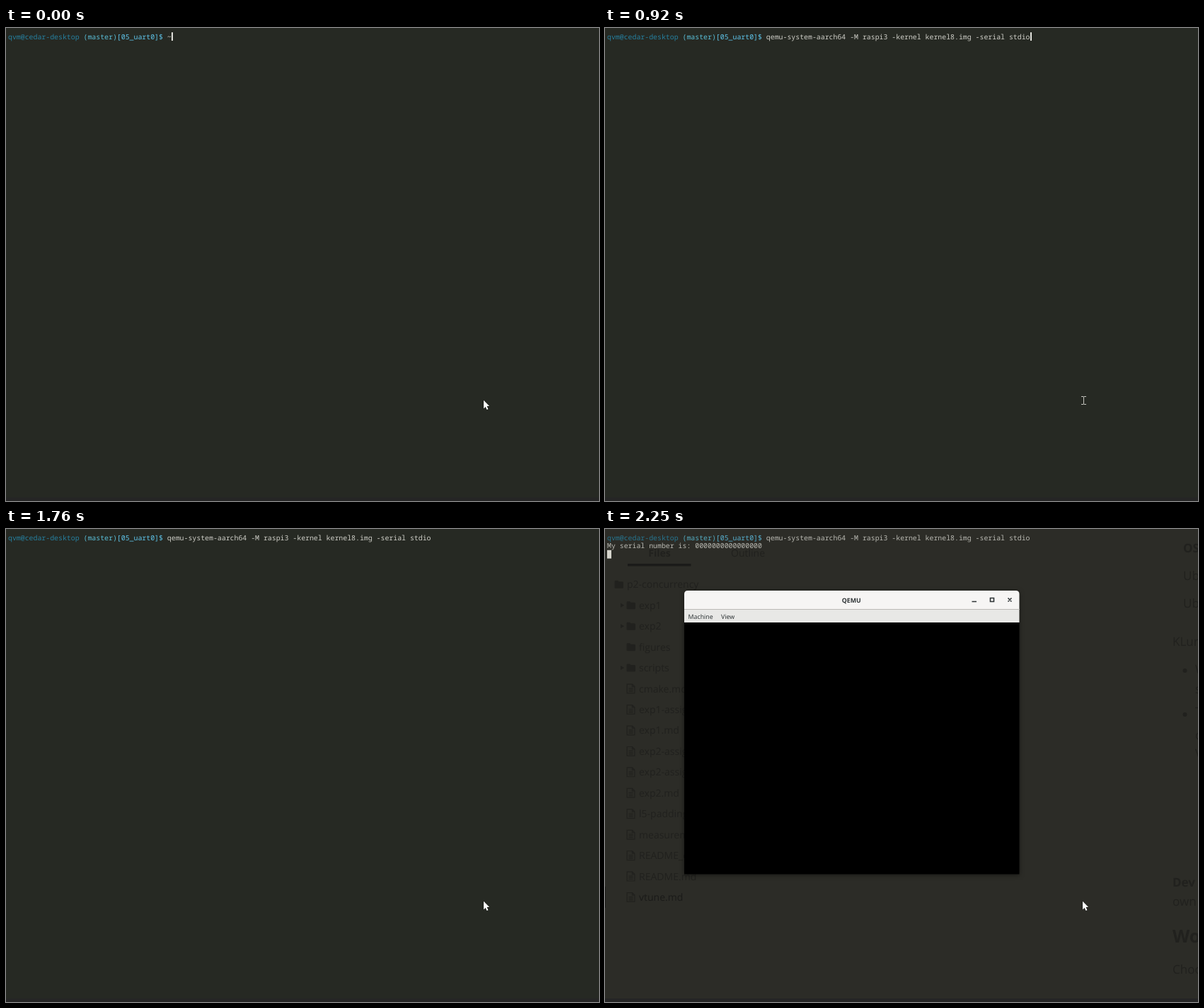
These frames come from a looping animation (838x668 px, 3630 ms). An HTML page:

```html
<!DOCTYPE html>
<html lang="en">
<head>
<meta charset="utf-8">
<title>Terminal session</title>
<style>
  html, body { margin: 0; width: 100%; height: 100%; overflow: hidden; background: #262923; }
  svg { display: block; width: 838px; height: 668px; text-rendering: geometricPrecision; }
  #term { font: 9.87px "Noto Sans Mono", "DejaVu Sans Mono", monospace; fill: #d0d0c9; }
  #term.blurred { opacity: .86; }
  #term text { white-space: pre; }
  .user { fill: #2680a0; }
  .branch { fill: #5abfd8; }
  .dir { fill: #5fc6ec; }
  #ghost { font: 14px "Open Sans", "Noto Sans", sans-serif; fill: #21211e; }
  #ghost .doc { font-size: 17px; }
  #ghost .bold { font-weight: 700; }
  #ghost .active { fill: #1b1b19; }
  #win { font: 8.8px "Noto Sans", "Open Sans", sans-serif; fill: #2e3436; filter: drop-shadow(0 1px 3px rgba(0, 0, 0, .5)); }
</style>
</head>
<body>
<svg viewBox="0 0 838 668">
  <defs>
    <path id="folder" d="M0 1.5q0-1.5 1.5-1.5h3l1.5 1.5h5q1.5 0 1.5 1.5v6.500q0 1.500-1.500 1.500h-9.500q-1.500 0-1.500-1.500z"/>
    <path id="file" fill="none" stroke="#21211e" stroke-width="1.2"
      d="M.6.6h7.400l3.400 3.400v9.400h-10.800zM8 .6v3.400h3.400M3 6.500h6M3 8.700h6M3 10.900h6"/>
  </defs>
  <rect id="back" width="838" height="668"/>
  <g id="ghost">
    <text class="bold" x="77" y="38.5" text-anchor="middle">Files</text>
    <text x="202" y="38.5" text-anchor="middle">Outline</text>
    <rect class="active" x="32" y="49" width="89.5" height="3.5"/>
    <rect class="active" y="505" width="1" height="30"/>
  </g>
  <rect y="663" width="838" height="5" fill="#252525"/>
  <g id="term">
    <text x="3" y="15.5"><tspan class="user">qvm@cedar-desktop</tspan> <tspan class="branch">(master)</tspan><tspan class="dir">[05_uart0]$ </tspan><tspan id="command"></tspan></text>
    <text id="output" x="3" y="27.4"></text>
  </g>
  <rect id="caret"/>
  <g id="win">
    <path fill="#f6f5f4" d="M112 114v-22q0-5 5-5h463.5q5 0 5 5v22z"/>
    <rect x="112" y="113" width="473.5" height="19" fill="#e8e8e6"/>
    <rect x="112" y="113" width="473.5" height="1" fill="#bcbab7"/>
    <rect x="112" y="132" width="473.5" height="355.5" fill="#000"/>
    <text x="348.3" y="103.5" text-anchor="middle" font-weight="700">QEMU</text>
    <text x="117.5" y="126.5">Machine</text>
    <text x="164" y="126.5">View</text>
    <path fill="none" stroke="#2e3436" stroke-width="1.6"
      d="M518.5 102.5h6.5M544.5 97.5h5v5h-5zM569.5 97.5l5 5m0-5l-5 5"/>
  </g>
  <path id="arrow" fill="#fff" stroke="#141512" stroke-width="1" paint-order="stroke"
    d="M675 525.800v11.600l2.600-2.500 1.900 4.200 2-.9-1.900-4.100h3.500z"/>
  <path id="beam" fill="none" stroke="#c6c6c0"
    d="M673 520.500h3l.5.5.5-.5h3M673 531.500h3l.5-.5.5.5h3M676.500 521v10"/>
</svg>
<script>
const LOOP = 3630, CELL = 5.922, ROW = 11.85;
const $ = id => document.getElementById(id);
const ghost = $("ghost");

function add(tag, attrs, text = "") {
  const el = document.createElementNS("http://www.w3.org/2000/svg", tag);
  for (const key in attrs) el.setAttribute(key, attrs[key]);
  el.textContent = text;
  ghost.append(el);
}

// Faint file list showing through the terminal: > expandable, / folder.
const files = ["/p2-concurrency", ">exp1", ">exp2", "/figures", ">scripts", "cmake.md",
  "exp1-assignment.md", "exp1.md", "exp2-assignment-qa.md", "exp2-assignment.md", "exp2.md",
  "l5-padding-quirks.txt", "measurement.md", "README_qvm.txt", "README.md", "vtune.md"];
files.forEach((entry, i) => {
  const y = 78.3 + i * 29.45, x = i ? 48 : 31;
  const folder = /^[>/]/.test(entry);
  add("use", { href: folder ? "#folder" : "#file", x: x - 17.5, y: y - (folder ? 5.5 : 7) });
  if (entry[0] === ">") add("path", { d: `M22 ${y - 3}l5 3-5 3z` });
  add("text", { x, y: y + 5, class: i === files.length - 1 ? "active" : "" }, entry.replace(/^[>/]/, ""));
});

// Faint document cut off by the right edge.
const notes = [
  [817, 33, "OS", "doc bold"], [817, 72, "Ub", "doc"], [817, 111, "Ub", "doc"],
  [802, 165, "KLur", "doc"], [834, 204, "W", "doc"], [834, 232, "s", "doc"],
  [834, 264, "T", "doc"], [834, 297, "c", "doc"], [834, 323, "V", "doc"],
  [802, 505, "Dev", "doc bold"], [802, 532, "own", "doc"], [802, 628, "Choo", "doc"]
];
for (const [x, y, text, kind] of notes) add("text", { x, y, class: kind }, text);
add("text", { x: 802, y: 584, class: "bold", style: "font-size:25px" }, "Wo");
for (const cy of [200, 262]) add("circle", { cx: 819.5, cy, r: 3 });

const run = "qemu-system-aarch64 -M raspi3 -kernel kernel8.img -serial stdio";
const serial = "My serial number is: ";

// caret is [column, row]; each step keeps the values it does not change.
const changes = [
  { at: 0, command: "~", output: "", caret: [39, 0], beam: false, blurred: false, win: false },
  { at: 440, caret: null },
  { at: 530, command: "", caret: [38, 0] },
  { at: 830, beam: true },
  { at: 920, command: run, caret: [38 + run.length, 0] },
  { at: 1230, caret: [0, 1], beam: false },
  { at: 1760, caret: null },
  { at: 2080, caret: [0, 1], blurred: true },
  { at: 2170, output: serial + "000", caret: [24, 1], win: true },
  { at: 2250, output: serial + "0".repeat(16), caret: [0, 2] }
];
const steps = [];
for (const change of changes) steps.push({ ...steps.at(-1), ...change });

const show = (id, on) => $(id).setAttribute("visibility", on ? "visible" : "hidden");

function draw(step) {
  $("command").textContent = step.command;
  $("output").textContent = step.output;
  $("term").classList.toggle("blurred", step.blurred);
  $("back").setAttribute("fill", step.blurred ? "#2c2c27" : "#262923");
  show("ghost", step.blurred);
  show("win", step.win);
  show("arrow", !step.beam);
  show("beam", step.beam);
  show("caret", step.caret);
  if (!step.caret) return;
  const [col, row] = step.caret;
  const box = {
    x: 3 + col * CELL, y: 6.1 + row * ROW,
    width: step.blurred ? 6 : 1.8, height: ROW, fill: step.blurred ? "#d6d5cd" : "#f8f8f2"
  };
  for (const key in box) $("caret").setAttribute(key, box[key]);
}

let current;
function tick() {
  const time = performance.now() % LOOP;
  const step = steps.findLast(s => s.at <= time);
  if (step !== current) draw(current = step);
  requestAnimationFrame(tick);
}
tick();
</script>
</body>
</html>
```
